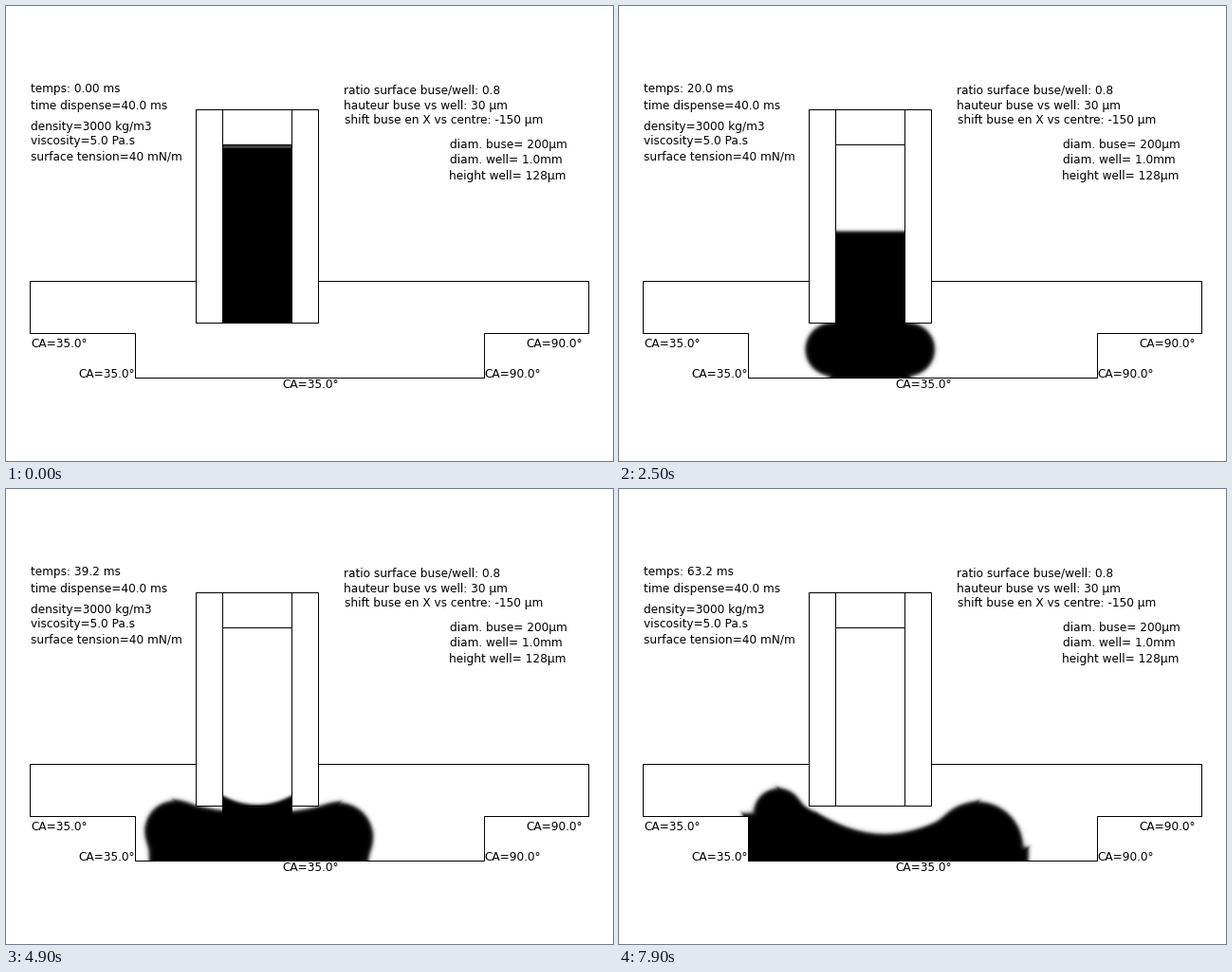
A matplotlib script for the animation above (8 s loop, 640 px wide and 480 px high).

```python
import numpy as np
import matplotlib as mpl
import matplotlib.pyplot as plt
from matplotlib.animation import FuncAnimation

W, H, DPI = 640, 480, 100
FRAMES, STEP = 80, 100
PX = 72 / DPI
AXIS = 264.75  # nozzle centre line

mpl.rcParams.update({"font.family": "DejaVu Sans", "font.size": 12.1 * PX})

# Each end of the drop is a round lobe: (step, x, y, radius).
SPREAD = [(0, 248, 320, 0), (9, 248, 354, 20), (15, 247.5, 360, 26.5),
          (33, 206, 364, 29)]
LEFT = SPREAD + [(49, 178, 360.5, 31.5), (65, 167, 338, 26), (79, 168, 342, 26)]
RIGHT = [(t, 2 * AXIS - x, y, r) for t, x, y, r in SPREAD] + [
    (49, 351, 367, 36), (65, 380, 364, 40), (79, 378, 378, 48)]

LABELS = [
    (26, 109, "time dispense=40.0 ms"),
    (26, 131, "density=3000 kg/m3"),
    (26, 146, "viscosity=5.0 Pa.s"),
    (26, 162, "surface tension=40 mN/m"),
    (356, 92, "ratio surface buse/well: 0.8"),
    (356, 109, "hauteur buse vs well: 30 µm"),
    (357, 124, "shift buse en X vs centre: -150 µm"),
    (468, 150, "diam. buse= 200µm"),
    (468, 166, "diam. well= 1.0mm"),
    (467, 183, "height well= 128µm"),
    (26, 360, "CA=35.0°"),
    (76, 392, "CA=35.0°"),
    (291, 403, "CA=35.0°"),
    (504, 392, "CA=90.0°"),
    (548, 360, "CA=90.0°"),
]
WALLS = [
    [(200, 290), (25, 290), (25, 345), (136, 345), (136, 392),
     (504, 392), (504, 345), (614, 345), (614, 290), (329, 290)],
    [(200, 109), (329, 109), (329, 334), (200, 334), (200, 109)],
    [(228, 109), (228, 334)],
    [(301, 109), (301, 334)],
    [(228, 146), (301, 146)],
]

yy, xx = np.mgrid[0:H, 0:W] + 0.5
AREA = np.s_[290:393, 105:455]  # part of the stage the drop can reach
X, Y = xx[AREA], yy[AREA]


def box(x0, x1, y0, y1):
    return (xx > x0) & (xx < x1) & (yy > y0) & (yy < y1)


BORE = box(228, 302, 146, 335)
OPEN = (box(25, 615, 290, 346) | box(136, 505, 290, 393)) \
    & ~box(200, 330, 109, 335) | BORE


def soft(d, k=0.42):
    """Blurred edge at signed distance d = 0."""
    return 0.5 * (1 + np.tanh(k * d))


def spot(x, y, rx, ry):
    return np.exp(-((xx - x) / rx) ** 2 - ((yy - y) / ry) ** 2)


def lobe(keys, t):
    times, *tracks = zip(*keys)
    return [np.interp(t, times, track) for track in tracks]


def union(parts, k=2.0):
    """Smooth union of signed distances."""
    return k * np.logaddexp.reduce([p / k for p in parts])


def drop(t):
    xl, yl, rl = lobe(LEFT, t)
    xr, yr, rr = lobe(RIGHT, t)
    # Foot widths as a share of the lobe radius.
    times = [25, 33, 49, 65, 79]
    fl = xl - rl * np.interp(t, times, [0, 0.6, 0.86, 0.85, 1.45])
    fr = xr + rr * np.interp(t, times, [0, 0.6, 0.86, 0.9, 1.12])
    bottom = yl + rl + np.interp(t, [24, 30, 65], [0, 20, 60])
    sag = np.interp(t, [33, 49, 65, 79], [0, 12, 47, 42])
    u = np.clip((X - xl) / (xr - xl), 0, 1)
    top = (yl - rl) * (1 - u) + (yr - rr) * u + sag * np.sin(np.pi * u)

    def slab(x0, x1, y0):
        return np.minimum.reduce([X - x0, x1 - X, Y - y0, bottom - Y])

    return soft(union([
        rl - np.hypot(X - xl, Y - yl),
        rr - np.hypot(X - xr, Y - yr),
        slab(xl, xr, top),
        slab(fl, xr, np.maximum(top, yl)),
        slab(xl, fr, np.maximum(top, yr)),
    ]))


def column(t):
    """Liquid in the bore, down to the middle of the drop."""
    level = np.interp(t, [0, 15, 49, 65], [147, 202, 323, 380])
    dip = np.interp(t, [33, 49], [0, 10])
    surface = level + dip * (1 - ((xx - AXIS) / 37) ** 2)
    end = max(335, lobe(LEFT, t)[1])
    ink = box(228, 302, 146, end) * soft(yy - surface, 0.5 if t else 4)
    mist = spot(258, level - 8, 7, 4) + spot(284, level - 8, 6, 4)
    return ink + 0.06 * np.interp(t, [8, 15, 21], [0, 1, 0]) * mist * BORE


def liquid(t):
    """Grey picture of the liquid, 1 = white."""
    ink = np.minimum(column(t), 1)
    if t == 0:
        ink[147:150] *= 0.75  # thin film on the resting surface
    ink[AREA] = np.maximum(ink[AREA], drop(t))
    glow = np.interp(t, [25, 33, 43], [0, 0.2, 0])
    ink *= 1 - glow * spot(AXIS, 391, 32, 16)
    return 1 - ink * OPEN


fig = plt.figure(figsize=(W / DPI, H / DPI), dpi=DPI, facecolor="white")
ax = fig.add_axes([0, 0, 1, 1])
ax.axis("off")
image = ax.imshow(np.ones((H, W)), cmap="gray", vmin=0, vmax=1,
                  extent=(0, W, H, 0), interpolation="nearest", aspect="auto")
ax.set(xlim=(0, W), ylim=(H, 0))

for wall in WALLS:
    ax.plot(*zip(*wall), color="black", lw=PX, solid_capstyle="projecting",
            solid_joinstyle="miter", snap=True)
for x, y, label in LABELS:
    ax.text(x, y, label, va="baseline")
clock = ax.text(26, 91, "", va="baseline")


def update(k):
    image.set_data(liquid(k))
    clock.set_text(f"temps: {0.8 * k:#.3g} ms")
    return image, clock


anim = FuncAnimation(fig, update, frames=FRAMES, interval=STEP,
                     init_func=lambda: update(0), repeat=True, repeat_delay=0)
plt.show()
```
